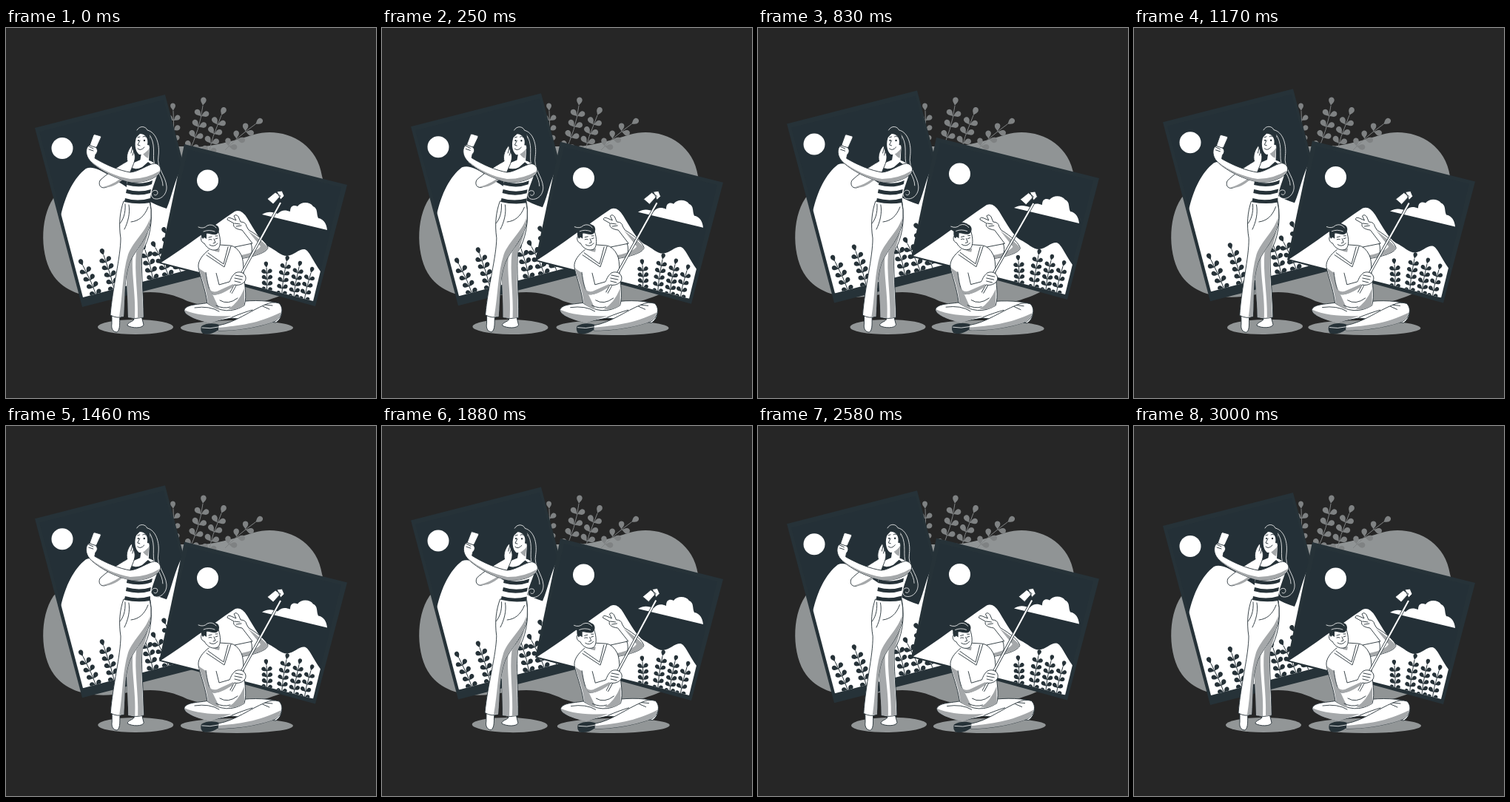
An HTML page that plays this animation: 500x500 px, repeating every 3.04 s.

```html
<!DOCTYPE html>
<html lang="en">
<head>
<meta charset="utf-8">
<title>Selfies</title>
<style>
html, body { margin: 0; height: 100%; overflow: hidden; background: #262626; }
svg { display: block; width: 100vw; height: 100vh; }
.w { fill: #fff; }
.d { fill: #263238; }
.g { fill: #a5a8aa; }
.floor { fill: #929697; }
.o { stroke: #263238; stroke-width: .9; stroke-linejoin: round; }
.l { fill: none; stroke: #263238; stroke-width: .9; stroke-linecap: round; stroke-linejoin: round; }
.h { fill: none; stroke: #fff; stroke-width: .8; stroke-linecap: round; }
</style>
</head>
<body>
<svg viewBox="0 0 500 500">
  <clipPath id="clipA"><path d="M45 140L213 97L272 320L104 364Z"/></clipPath>
  <clipPath id="clipB"><path d="M246 164L453 215L415 369L210 317Z"/></clipPath>

  <path fill="#909495" d="M64 230C45 258 46 310 65 336C84 362 122 368 160 361C195 354 218 356 245 369C290 385 350 374 385 355C430 320 438 240 427 200C420 152 372 133 335 144C305 153 270 164 240 160C190 160 100 190 64 230Z"/>
  <g id="backPlants"></g>

  <g id="photoA">
    <path class="d" d="M39 135L215 90L279 332L103 377Z"/>
    <g clip-path="url(#clipA)">
      <path fill="#243037" d="M45 140L213 97L272 320L104 364Z"/>
      <circle class="w" cx="76" cy="162.500" r="14.500"/>
      <path class="w" d="M74 254C80 226 92 202 108 190C122 184 142 202 160 213C178 226 200 239 217 244C224 228 228 205 238 187L275 180L290 370L100 380Z"/>
      <g id="plantsA"></g>
    </g>
  </g>

  <g id="photoB">
    <path class="d" d="M241 157L461 212L418 376L207 318Z"/>
    <g clip-path="url(#clipB)">
      <path fill="#243037" d="M246 164L453 215L415 369L210 317Z"/>
      <circle class="w" cx="272.500" cy="206" r="14.500"/>
      <path class="w" d="M208 318C240 298 275 271 309 248Q318 244 326 257C335 272 345 290 354 295C365 300 371 308 380 308C389 307 395 299 403 299C410 300 413 313 430 336L418 380Z"/>
      <path class="w" d="M346 252C354 247 361 249 367 251C373 245 378 246 384 248C384 239 390 239 394 241C399 234 411 235 415 241C422 244 419 251 422 257C429 258 433 264 434 273Z"/>
      <g id="plantsB"></g>
    </g>
  </g>

  <g id="woman">
    <ellipse class="floor" cx="175" cy="404" rx="51" ry="10"/>
    <!-- hair -->
    <path class="d" d="M177 146C174 137 183 131 190 135C202 139 207 154 206 172C203 188 217 201 217 216C217 229 208 234 200 230C188 215 186 190 187 172Z"/>
    <path class="h" d="M177 138C181 131 189 133 191 138C203 141 208 157 206 173C203 189 216 200 217 214C218 226 207 234 199 230C193 225 198 217 204 220C207 224 202 228 200 225M193 143C203 156 198 171 200 181C203 192 212 202 212 213"/>
    <!-- feet -->
    <path class="w o" d="M143 388L154 388C153 398 155 407 150 411C144 411 142 405 143 400ZM172 389L183 389L186 401C185 406 170 406 164 402C164 398 171 397 173 394Z"/>
    <!-- trousers -->
    <path class="w o" d="M164 300C162 335 165 365 165 391Q175 394 186 391C186 360 182 325 184 302C194 286 199 262 195 235L170 240Z"/>
    <path class="g" d="M184 303C181 327 185 360 185 391L178 392C179 360 173 330 176 303L193 275ZM163 320L172 304C168 325 176 360 174 392L165 391C165 365 162 345 163 320Z"/>
    <path class="w o" d="M159 234C154 248 152 265 155 284C155 310 144 350 141 388Q150 393 159 390C161 365 159 340 167 317C174 300 194 283 196 258Q197 245 194 234Z"/>
    <path class="g" d="M195 256C190 274 172 288 165 306C157 332 158 360 153 390L159 390C161 365 159 340 167 317C174 300 194 283 195 256Z"/>
    <path class="l" d="M161 238C162 250 158 260 154 264M166 239C168 250 165 262 160 272M192 242C187 255 179 261 169 262"/>
    <!-- neck and top -->
    <path class="w" d="M184 162L181 181L168 187L164 203L161 236L195 236C194 221 203 207 207 189Q199 180 193 179L194 160Z"/>
    <path class="g" d="M184 168Q190 169 194 162L192 176Q187 174 184 168Z"/>
    <path class="d" d="M166 187Q174 193 184 188L192 181L196 184L194 195L165 197ZM164 207Q182 213 198 206L197 211Q182 217 163 212ZM163 218Q180 223 196 218L195 223Q179 228 162 223ZM161 230Q178 235 195 230L195 236Q178 239 160 235Z"/>
    <path class="w" d="M168 184Q176 190 185 184L191 180L182 178Z"/>
    <!-- arm at the cheek -->
    <path class="w o" d="M170 159C165 164 162 173 164 180C150 188 135 198 127 206C124 213 129 218 136 215C148 211 158 204 167 197C170 188 176 179 174 171Z"/>
    <path class="g" d="M164 196C153 206 143 212 131 215Q140 217 151 210Q160 204 167 197Z"/>
    <!-- face -->
    <path class="w" d="M177 146C173 154 174 167 180 171C187 172 193 165 194 157L195 147C190 139 181 140 177 146Z"/>
    <path class="d" d="M176 148C177 139 187 137 194 143L196 159L191 158C193 149 188 143 181 143Z"/>
    <path class="l" d="M178 148l3-1M185 147q2-2 4 0M181 152L178 158L181 159M178 163Q182 167 187 161M171 161l-2 8M173 165l-2 7"/>
    <circle class="d" cx="179" cy="152" r="1.100"/><circle class="d" cx="187" cy="152" r="1.200"/>
    <!-- arm with phone -->
    <path class="w o" d="M109 171C107 162 112 156 117 159C123 161 126 166 121 171L120 176C135 185 154 193 168 195C180 194 192 184 201 183C208 184 212 191 206 198C197 206 181 210 168 208C148 204 127 192 116 182C112 178 110 175 109 171Z"/>
    <path class="g" d="M116 181C130 192 149 201 168 204Q190 204 208 193Q205 201 194 205Q180 210 167 208Q144 203 116 182Z"/>
    <path class="w o" d="M118 145Q119 143 121 144L128 146Q129 147 128 149L123 160Q122 162 120 161L114 159Q113 158 114 156Z"/>
    <path class="l" d="M112 160l6 3M112 164l6 2"/>
  </g>

  <g id="man">
    <ellipse class="floor" cx="312" cy="405" rx="76" ry="10"/>
    <!-- legs -->
    <path class="d" d="M264 403C272 398 282 399 288 401L287 408C280 413 273 415 266 413Q262 409 264 403Z"/>
    <path class="w o" d="M275 371C260 374 244 373 241 381C241 389 258 394 275 398L304 392L365 398C374 392 375 379 369 372C350 367 325 368 307 371Z"/>
    <path class="g" d="M241 381C243 390 260 395 276 399L305 389C286 390 258 389 241 381Z"/>
    <path class="w o" d="M287 402C310 398 330 382 350 374Q360 369 369 372C376 379 373 390 364 396C340 405 310 409 287 409Z"/>
    <path class="g" d="M287 405C315 402 340 400 372 384Q369 394 359 398C335 406 308 409 287 409Z"/>
    <path class="l" d="M305 391Q322 384 333 381M347 376l9 4M350 374l10 1M255 378Q275 375 288 383"/>
    <path class="h" d="M265 405Q276 407 287 404"/>
    <!-- raised arm -->
    <path class="w o" d="M309 296L333 291L319 273C310 272 306 268 308 264L299 259Q299 255 304 257L311 260L308 254Q311 251 314 255L317 262Q324 262 325 268L328 273C342 281 353 291 354 297C352 304 334 309 316 312Z"/>
    <path class="g" d="M327 274C340 283 352 293 354 297C350 305 332 309 316 312L318 307C333 304 342 299 344 295Z"/>
    <path class="l" d="M331 291Q334 299 331 307M309 264l7 1M311 268l7-1"/>
    <!-- torso -->
    <path class="w o" d="M274 300C266 306 259 315 260 323C262 336 269 350 272 372Q298 390 322 375C326 362 322 345 321 330Q321 313 318 307Q312 295 303 294L288 293Z"/>
    <path class="g" d="M261 325C264 338 271 351 273 372Q280 379 289 381C280 361 272 348 270 331ZM300 380Q314 372 322 352L322 375Q312 382 300 380Z"/>
    <path class="l" d="M273 304L294 319L300 296M271 307L295 323L304 295M289 368Q300 375 313 365M284 375Q294 380 303 377"/>
    <!-- neck and head -->
    <path class="w" d="M272 288L275 303L293 316L298 297L288 293Z"/>
    <path class="g" d="M274 293Q279 301 289 298L288 303Q278 302 274 293Z"/>
    <path class="w o" d="M266 281C262 282 263 290 268 291C272 299 280 302 286 299C291 295 290 284 287 275L270 274Z"/>
    <path class="d" d="M266 285C262 280 265 276 263 275C256 272 258 265 265 266C268 261 280 263 283 266C290 268 289 277 284 279C278 280 274 277 271 278L271 285L268 283Z"/>
    <path class="h" d="M260 269Q267 272 272 267Q279 264 284 270M267 275Q274 272 282 275"/>
    <path class="l" d="M274 283l4-1M283 281l3 0M274 286q2-1 4 0M283 285l3-1M281 285L283 290L280 291M275 293Q281 297 286 291"/>
    <!-- stick and phone -->
    <path d="M304 358L371 236" fill="none" stroke="#263238" stroke-width="3.600"/>
    <path d="M304 358L371 236" fill="none" stroke="#fff" stroke-width="2"/>
    <path class="w o" d="M353 231L364 222L371 227L361 238ZM366 221L373 220L376 227L371 232L368 225Z"/>
    <!-- lower arm -->
    <path class="w o" d="M270 330C272 343 274 356 280 360C288 361 300 353 309 347C316 349 325 344 324 337C323 331 316 328 310 331C304 336 304 340 302 343L288 347L284 331"/>
    <path class="g" d="M273 350Q277 358 285 356L307 346L308 349C298 356 287 362 280 360Q275 357 273 350Z"/>
    <path class="l" d="M310 334l10 2M309 338l10 2M309 342l8 2"/>
  </g>
</svg>
<script>
const $ = id => document.getElementById(id);

// A curved stem with paired leaves and one leaf at the tip.
function plant(x0, y0, x1, y1, pairs, size, bend, color) {
  const cx = (x0 + x1) / 2 + bend, cy = (y0 + y1) / 2;
  const leaf = (x, y, a) => `<path fill="${color}" transform="translate(${x} ${y}) rotate(${a}) scale(${size})" d="M0 0C.3 -.1 .4 -.36 .75 -.34C1.150 -.28 1.150 .28 .75 .34C.4 .36 .3 .1 0 0"/>`;
  let out = `<path d="M${x0} ${y0}Q${cx} ${cy} ${x1} ${y1}" fill="none" stroke="${color}"/>`;
  for (let i = 0; i <= pairs; i++) {
    const t = (i + .5) / (pairs + .5), u = 1 - t;
    const x = u * u * x0 + 2 * u * t * cx + t * t * x1;
    const y = u * u * y0 + 2 * u * t * cy + t * t * y1;
    const a = Math.atan2(u * (cy - y0) + t * (y1 - cy), u * (cx - x0) + t * (x1 - cx)) * 180 / Math.PI;
    out += i < pairs ? leaf(x, y, a - 52) + leaf(x, y, a + 52) : leaf(x, y, a);
  }
  return out;
}
const grow = (id, color, list) => $(id).innerHTML = list.map(p => plant(...p, color)).join('');

grow('backPlants', '#7f8283', [
  [246, 170, 266, 105, 4, 11, 6],
  [272, 175, 291, 118, 4, 11, -3],
  [222, 172, 226, 112, 4, 10, 4],
  [296, 165, 337, 130, 3, 11, -4]
]);
grow('plantsA', '#263238', [
  [124, 366, 104, 321, 4, 9, 2],
  [148, 360, 132, 307, 5, 9, 2],
  [200, 345, 188, 300, 4, 9, 2],
  [222, 340, 202, 297, 4, 9, 2],
  [236, 330, 216, 278, 5, 9, 2]
]);
grow('plantsB', '#263238', [
  [352, 360, 352, 324, 4, 8, 2],
  [372, 366, 379, 316, 5, 8, -2],
  [388, 370, 396, 323, 5, 8, -2],
  [402, 374, 412, 331, 4, 8, -2]
]);

// Triangle waves: up and back, and sway to both sides.
const lift = p => -10 * (1 - Math.abs(1 - 2 * p));
const sway = p => p < .25 ? 4 * p : p < .75 ? 2 - 4 * p : 4 * p - 4;
const set = (id, value) => $(id).setAttribute('transform', value);

function draw(now) {
  const t = Math.min(now % 3040, 3000);
  const slow = t / 3000 % 1, fast = t / 1500 % 1;
  set('photoA', `translate(0 ${lift(slow)})`);
  set('photoB', `translate(0 ${lift(fast)})`);
  set('woman', `rotate(${sway(fast)} 168 272)`);
  set('man', `rotate(${sway(slow)} 312 318)`);
}
const start = performance.now();
function tick() {
  draw(performance.now() - start);
  requestAnimationFrame(tick);
}
tick();
</script>
</body>
</html>
```
